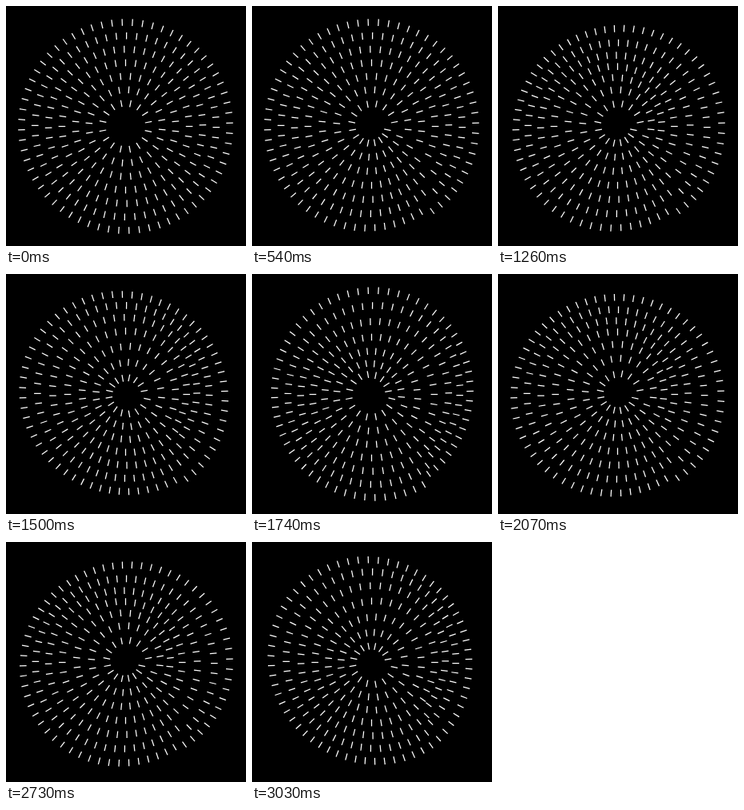
Animation of 300 by 300 pixels, one loop 3.06 s. Source, as an HTML page:

```html
<!DOCTYPE html>
<html lang="en">
<head>
<meta charset="utf-8">
<title>Radial ripple</title>
<style>
  html, body { margin: 0; width: 100%; height: 100%; overflow: hidden; background: #000; }
  svg { display: block; width: 100vw; height: 100vh; }
  line { stroke: #fff; stroke-width: 1.25; }
</style>
</head>
<body>
<svg id="stage" viewBox="0 0 300 300"></svg>
<script>
const LOOP = 3060, STEP = 30, PERIOD = 720;
const CENTER_X = 149.5, CENTER_Y = 150.5;
const RINGS = 7, HALF_LENGTH = 4.3, AMPLITUDE = 8.8;
const SVG_NS = "http://www.w3.org/2000/svg";
const stage = document.getElementById("stage");
const ticks = [];

function addTick(ring, angle) {
  const line = document.createElementNS(SVG_NS, "line");
  const radius = 29 + 16.85 * ring;
  line.setAttribute("transform", `translate(${CENTER_X} ${CENTER_Y}) rotate(${angle})`);
  stage.appendChild(line);
  // The wave sweeps clockwise, slower on the outer rings.
  const delay = 138 - 7.5 * ring + (1.25 + 0.34 * ring) * angle;
  ticks.push({ line, radius, delay });
}

for (let ring = 0; ring < RINGS; ring++) {
  const count = 16 + 8 * ring;
  const start = 12 + 8 * ring;
  for (let i = 0; i < count; i++) addTick(ring, start + i * 360 / count);
}

function inwardShift(elapsed) {
  if (elapsed <= 0) return 0;
  return AMPLITUDE * (1 - Math.cos(2 * Math.PI * elapsed / PERIOD)) / 2;
}

function render(time) {
  for (const { line, radius, delay } of ticks) {
    const r = radius - inwardShift(time - delay);
    line.setAttribute("x1", (r - HALF_LENGTH).toFixed(2));
    line.setAttribute("x2", (r + HALF_LENGTH).toFixed(2));
  }
}

const origin = performance.now();
function tick() {
  const time = (performance.now() - origin) % LOOP;
  render(Math.floor(time / STEP) * STEP);
  requestAnimationFrame(tick);
}
tick();
</script>
</body>
</html>
```
